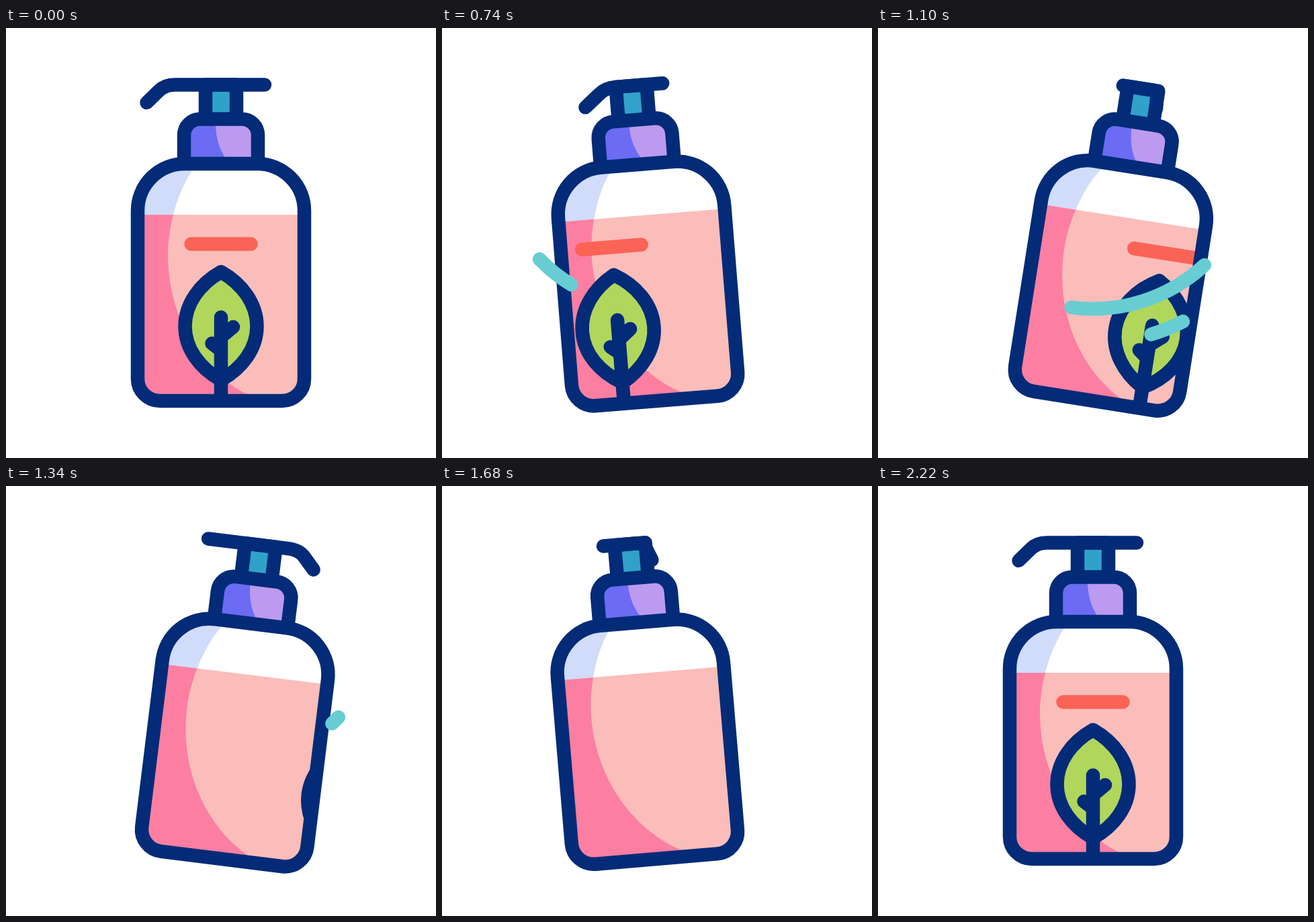
Animation, 640 px wide and 640 px high, one loop 2400 ms. Source, as an HTML page with a canvas:

```html
<!DOCTYPE html>
<html lang="en">
<head>
<meta charset="utf-8">
<title>Soap bottle</title>
<style>
html, body { margin: 0; width: 100%; height: 100%; overflow: hidden; background: #fff; }
canvas { display: block; width: 100vw; height: 100vh; object-fit: contain; }
</style>
</head>
<body>
<canvas id="stage" width="640" height="640"></canvas>
<script>
const ctx = document.getElementById('stage').getContext('2d');
const LOOP = 2400, STEP = 20, LINE = 20.5;
const NAVY = '#032b77', TEAL = '#67cdd3', RED = '#fb6356', GREEN = '#b0d65c';

const smooth = u => u * u * (3 - 2 * u);
const ramp = (t, from, to) => smooth(Math.min(1, Math.max(0, (t - from) / (to - from))));
const mix = (a, b, p) => a + (b - a) * p;

// keys: [[time, value], ...], eased in and out between neighbours
function track(t, keys) {
  let value = keys[0][1];
  for (let i = 1; i < keys.length; i++) {
    const [t0, a] = keys[i - 1], [t1, b] = keys[i];
    if (t >= t0) value = mix(a, b, t1 > t0 ? ramp(t, t0, t1) : 1);
  }
  return value;
}

const TILT = [[200, 0], [600, -7], [1190, 10], [1715, -5], [2200, 0]];
const SLIDE = [[200, 0], [700, -50], [1550, 209], [1550, -209], [2200, 0]];

// x of the spout's points, relative to the bottle's axis
const SPOUT = [
  { tip: -110.5, bend: -92.5, corner: -83.5, bar: -69, end: 65 },
  { tip: -72, bend: -50, corner: -40, bar: -24, end: 48 },
  { tip: 86, bend: 69, corner: 60, bar: 43, end: -81 }
];
const spoutX = (t, name) => {
  const [rest, turn, back] = SPOUT.map(pose => pose[name]);
  return 320 + track(t, [[200, rest], [700, turn], [1400, back], [2200, rest]]);
};

const body = new Path2D('M196 272 A70 70 0 0 1 266 202 H374 A70 70 0 0 1 444 272 V522 A33 33 0 0 1 411 555 H229 A33 33 0 0 1 196 522 Z');
const shade = new Path2D('M277 212 C258 240 241 290 241 338 C241 430 290 510 360 546 L360 570 H180 V190 H290 Z');
const cap = new Path2D('M265 202 V159.5 A24 24 0 0 1 289 135.5 H351 A24 24 0 0 1 375 159.5 V202');
const capShade = new Path2D('M312 130 V145 Q313 174 327 194 L332 202 H255 V130 Z');
const neck = new Path2D('M297 132 V84.5 H343 V132');
const leaf = new Path2D('M320 363 C288 381 266.5 411 266.5 444 S288 506 320 524 C352 506 373.5 477 373.5 444 S352 381 320 363 Z');
const veins = new Path2D('M320 430.5 V555 M338 445 L320 460 M306.5 469.5 L320 480');
const dash = new Path2D('M275.5 321.5 H364.5');

function fill(path, color) {
  ctx.fillStyle = color;
  ctx.fill(path);
}

function stroke(path, color) {
  ctx.strokeStyle = color;
  ctx.stroke(path);
}

function clipped(path, draw) {
  ctx.save();
  ctx.clip(path);
  draw();
  ctx.restore();
}

function block(y, h, color) {
  ctx.fillStyle = color;
  ctx.fillRect(180, y, 280, h);
}

function drawLabel(t) {
  ctx.translate(track(t, SLIDE), 0);
  stroke(dash, RED);
  fill(leaf, GREEN);
  stroke(leaf, NAVY);
  stroke(veins, NAVY);
}

function drawPump(t) {
  const x = name => spoutX(t, name);
  const spout = new Path2D();
  spout.moveTo(x('tip'), 111);
  spout.lineTo(x('bend'), 93.5);
  spout.quadraticCurveTo(x('corner'), 84.5, x('bar'), 84.5);
  spout.lineTo(x('end'), 84.5);
  fill(neck, '#30a2ca');
  stroke(neck, NAVY);
  stroke(spout, NAVY);
}

function drawBottle(t) {
  ctx.save();
  ctx.translate(320, 565);
  ctx.rotate(track(t, TILT) * Math.PI / 180);
  ctx.translate(-320, -565);

  drawPump(t);
  fill(cap, '#bb9af0');
  clipped(cap, () => fill(capShade, '#6c6bf4'));
  stroke(cap, NAVY);

  clipped(body, () => {
    block(190, 380, '#fff');
    block(278, 290, '#fbbdba');
    clipped(shade, () => {
      block(190, 88, '#d1dcfa');
      block(278, 290, '#fc7fa2');
    });
    drawLabel(t);
  });
  stroke(body, NAVY);
  ctx.restore();
}

// arc around (320, 174); angles in degrees from straight down, positive to the right
function swoosh(radius, from, to, tail, head) {
  if (head <= 0 || tail >= 1) return;
  const angle = p => (90 - mix(from, to, p)) * Math.PI / 180;
  const path = new Path2D();
  path.arc(320, 174, radius, angle(tail), angle(head), true);
  stroke(path, TEAL);
}

function draw(t) {
  ctx.fillStyle = '#fff';
  ctx.fillRect(0, 0, 640, 640);
  ctx.lineWidth = LINE;
  ctx.lineCap = ctx.lineJoin = 'round';
  drawBottle(t);
  swoosh(244, -45.8, 45.8, ramp(t, 860, 1400), ramp(t, 600, 1160));
  swoosh(295, 0, 27, ramp(t, 900, 1240), ramp(t, 740, 1000));
}

const start = performance.now();
function frame() {
  const t = (performance.now() - start) % LOOP;
  draw(Math.floor(t / STEP) * STEP);
  requestAnimationFrame(frame);
}
frame();
</script>
</body>
</html>
```
